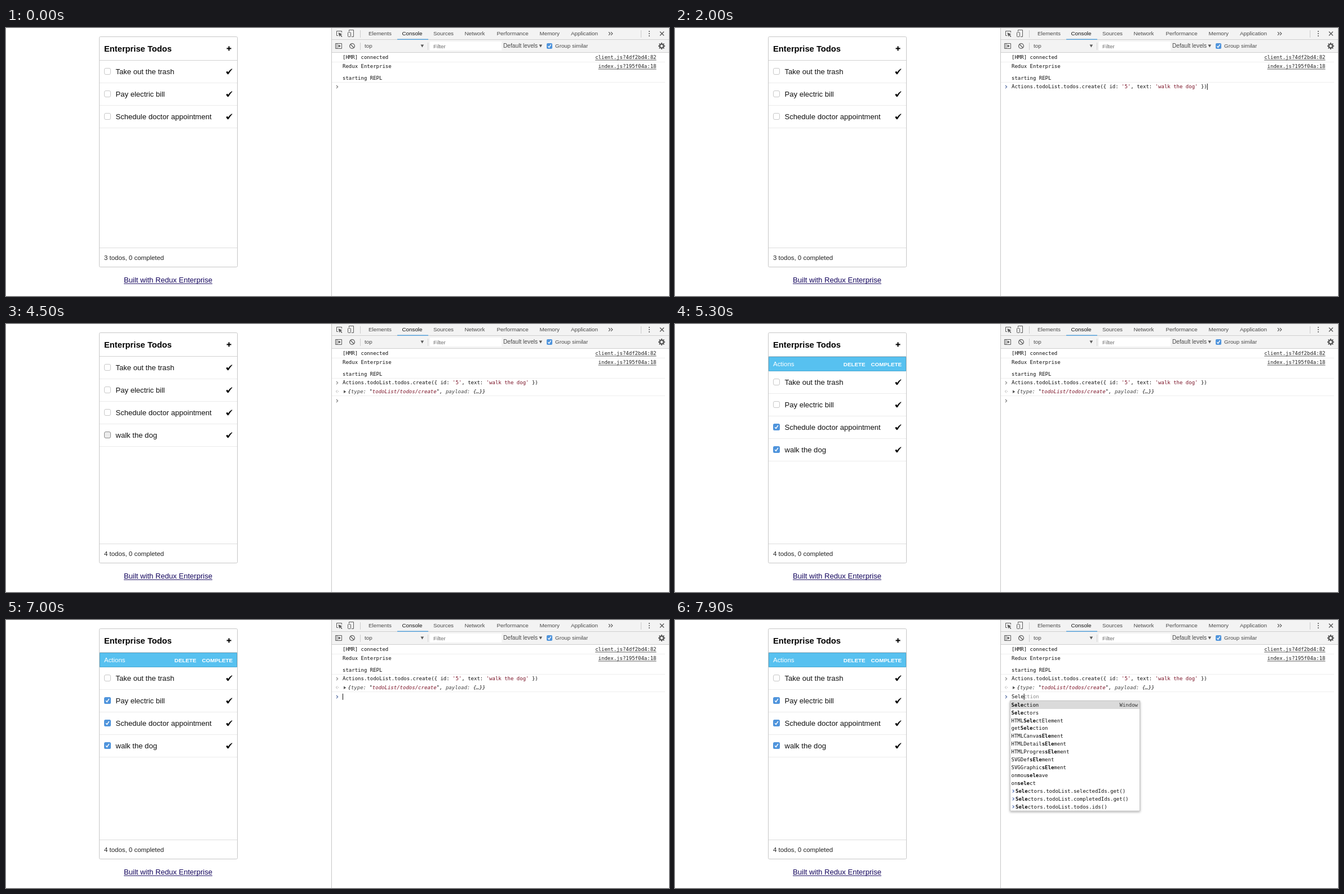
Write an HTML page with a canvas that moves like this. It is 1176 px wide and 476 px high and loops after 8000 ms.

```html
<!DOCTYPE html>
<html lang="en">
<head>
<meta charset="utf-8">
<title>Todo list with console</title>
<style>
html, body { margin: 0; width: 100%; height: 100%; overflow: hidden; background: #fff; }
canvas { display: block; }
</style>
</head>
<body>
<canvas id="stage" width="1176" height="476"></canvas>
<script>
const ctx = document.getElementById('stage').getContext('2d');
const LOOP = 8000;
const SANS = '"Liberation Sans", Arial, sans-serif';
const MONO = '"DejaVu Sans Mono", monospace';
const CODE = `9px ${MONO}`;
const CODE_BOLD = `bold 9px ${MONO}`;
const CODE_ITALIC = `italic 9px ${MONO}`;
const UI = `9.82px ${SANS}`;
const CHAR = 5.418;
const INK = '#111', RED = '#7a1226', BLUE = '#4f94dc';

// Moments of the story, in ms
const FOCUS = 900, RECALL = 1600, RUN = 2400, BLUR = 4000;
const REFOCUS = 6700;
const KEYS = [7300, 7500, 7700, 7800];
const TODOS = [
  { text: 'Take out the trash' },
  { text: 'Pay electric bill', press: 5800, check: 5900 },
  { text: 'Schedule doctor appointment', press: 5000, check: 5100 },
  { text: 'walk the dog', press: 4400, check: 4600 }
];
const COMMAND = [
  ['Actions.todoList.todos.create({ id: ', INK], ["'5'", RED],
  [', text: ', INK], ["'walk the dog'", RED], [' })', INK]
];
const RESULT = [
  ['{', INK], ['type: ', '#444'], ['"', INK], ['todoList/todos/create', RED],
  ['", ', INK], ['payload: ', '#444'], ['{…}}', INK]
];
const HINTS = ['Selection', 'Selectors', 'HTMLSelectElement', 'getSelection',
  'HTMLCanvasElement', 'HTMLDetailsElement', 'HTMLProgressElement', 'SVGDefsElement',
  'SVGGraphicsElement', 'onmouseleave', 'onselect'];
const HISTORY = ['Selectors.todoList.selectedIds.get()',
  'Selectors.todoList.completedIds.get()', 'Selectors.todoList.todos.ids()'];

function rect(x, y, w, h, color) {
  ctx.fillStyle = color;
  ctx.fillRect(x, y, w, h);
}

function text(str, x, y, font, color = INK, align = 'left') {
  ctx.font = font;
  ctx.fillStyle = color;
  ctx.textAlign = align;
  ctx.fillText(str, x, y);
}

function runs(parts, x, y, font) {
  for (const [str, color] of parts) {
    text(str, x, y, font, color);
    x += str.length * CHAR;
  }
  return x;
}

function line(points, color, width = 1) {
  ctx.strokeStyle = color;
  ctx.lineWidth = width;
  ctx.beginPath();
  points.forEach(([x, y]) => ctx.lineTo(x, y));
  ctx.stroke();
}

function poly(points, color) {
  ctx.fillStyle = color;
  ctx.beginPath();
  points.forEach(([x, y]) => ctx.lineTo(x, y));
  ctx.fill();
}

function box(x, y, w, h, r, fill, stroke) {
  ctx.beginPath();
  ctx.roundRect(x, y, w, h, r);
  ctx.fillStyle = fill;
  ctx.fill();
  if (!stroke) return;
  ctx.strokeStyle = stroke;
  ctx.lineWidth = 1;
  ctx.stroke();
}

function circle(x, y, r, color, width) {
  ctx.beginPath();
  ctx.arc(x, y, r, 0, 7);
  ctx.lineWidth = width;
  ctx.strokeStyle = ctx.fillStyle = color;
  width ? ctx.stroke() : ctx.fill();
}

const chevron = (x, y, color, s = 2.6) =>
  line([[x, y - s], [x + s, y], [x, y + s]], color, 1.2);

const downArrow = (x, y) => poly([[x - 2.8, y - 2.4], [x + 2.8, y - 2.4], [x, y + 2.6]], '#5a5a5a');

function heavyCheck(x, y) {
  ctx.fillStyle = INK;
  ctx.beginPath();
  ctx.moveTo(x - 5.6, y + 1.8);
  ctx.quadraticCurveTo(x - 4.2, y - 1, x - 2.8, y + .2);
  ctx.lineTo(x - 1.9, y + 1.5);
  ctx.quadraticCurveTo(x + 1, y - 3, x + 4.6, y - 4.8);
  ctx.quadraticCurveTo(x + 5.8, y - 4.8, x + 5.2, y - 3.8);
  ctx.quadraticCurveTo(x + 1.5, y + .2, x - 1, y + 4.4);
  ctx.quadraticCurveTo(x - 2.6, y + 6, x - 3.6, y + 4.6);
  ctx.fill();
}

function checkbox(x, y, checked, pressed) {
  if (checked) {
    box(x - 6, y - 6, 12, 12, 2.5, BLUE);
    line([[x - 2.8, y + .2], [x - .9, y + 2.5], [x + 2.9, y - 3]], '#fff', 1.4);
  } else {
    box(x - 5.5, y - 5.5, 11, 11, 2.5, pressed ? '#ececec' : '#fff', pressed ? '#8c8c8c' : '#c8c8c8');
  }
}

function drawTodos(t) {
  const count = t < RUN ? 3 : 4;
  const picking = t >= TODOS[3].check;
  box(165.5, 15.5, 245, 409, 2, '#fff', '#c6c6c6');
  text('Enterprise Todos', 174, 42, `bold 14.73px ${SANS}`, '#000');
  rect(391.5, 35.4, 8, 2, '#000');
  rect(394.5, 32.4, 2, 8, '#000');
  rect(166, 57, 244, 1, '#d2d2d2');

  if (picking) {
    box(166.5, 58.5, 243, 25, 0, '#57c1f0', '#4fa9d2');
    text('Actions', 174, 75.3, `11.45px ${SANS}`, '#fff');
    const strong = `bold 9.82px ${SANS}`;
    text('DELETE', 337.5, 75, strong, '#fff', 'right');
    text('COMPLETE', 402, 75, strong, '#fff', 'right');
  }

  TODOS.slice(0, count).forEach((todo, i) => {
    const y = 77 + i * 40 + (picking ? 26 : 0);
    const checked = t >= todo.check;
    checkbox(180, y, checked, !checked && t >= todo.press);
    text(todo.text, 194.5, y + 5, `13.09px ${SANS}`);
    heavyCheck(396, y);
    rect(166, y + 20, 244, 1, '#ebebeb');
  });

  rect(166, 390, 244, 1, '#dedede');
  text(`${count} todos, 0 completed`, 174, 411.5, `11.45px ${SANS}`, '#222');
  text('Built with Redux Enterprise', 209, 452.3, `13.09px ${SANS}`, '#14065e');
  rect(209, 453.6, 157, 1, '#14065e');
}

function drawTabs() {
  const ink = '#5a5a5a';
  rect(578, 0, 598, 43, '#f3f3f3');
  rect(578, 20, 598, 1, '#cfcfcf');
  rect(578, 43, 598, 1, '#cfcfcf');
  rect(577, 0, 1, 476, '#c6c6c6');

  // Inspect and device icons
  line([[589, 13.5], [586.5, 13.5], [586.5, 5.5], [595.5, 5.5], [595.5, 8]], ink);
  poly([[589.5, 8], [596.5, 11], [593.8, 12], [596.5, 15], [595.3, 16], [592.6, 13], [591.2, 15.4]], ink);
  line([[608.5, 6], [608.5, 3.5], [616.5, 3.5], [616.5, 15.5], [613, 15.5]], ink);
  box(606.5, 7.5, 5, 8, 1, '#f3f3f3', ink);
  rect(628, 4, 1, 13, '#ccc');

  const tabs = { Elements: 643, Console: 702.5, Sources: 758, Network: 813.5,
    Performance: 870.5, Memory: 946.5, Application: 1002 };
  for (const name in tabs) {
    text(name, tabs[name], 13.2, UI, name === 'Console' ? INK : '#4a4a4a');
  }
  rect(694, 19.5, 55, 1.5, '#55a0d8');
  for (const x of [1069, 1073]) chevron(x, 10, ink, 2.8);
  rect(1126, 4, 1, 13, '#ccc');
  for (const y of [6, 10, 14]) circle(1141, y, 1.1, ink);
  line([[1160, 6.5], [1167, 13.5]], ink, 1.4);
  line([[1167, 6.5], [1160, 13.5]], ink, 1.4);
}

function drawToolbar() {
  const ink = '#5a5a5a';
  box(584.5, 27.5, 11, 9, 0, '#f3f3f3', ink);
  rect(586.5, 28, 1, 8, ink);
  poly([[589.5, 29.3], [593.8, 32], [589.5, 34.7]], ink);
  circle(614, 32, 4.4, ink, 1.3);
  line([[611, 29], [617, 35]], ink, 1.3);
  rect(628, 26, 1, 13, '#ccc');
  text('top', 636, 35.2, UI, '#4a4a4a');
  downArrow(738.3, 32);
  rect(748, 26, 1, 13, '#d4d4d4');
  rect(752, 24, 127, 16, '#fff');
  text('Filter', 758, 35.5, UI, '#6c6c6c');
  text('Default levels', 882, 35.2, `10.2px ${SANS}`, '#4a4a4a');
  downArrow(948.3, 32);
  box(959, 27, 10, 10, 2, BLUE);
  line([[961.4, 32.2], [963.3, 34.4], [966.6, 29.3]], '#fff', 1.4);
  text('Group similar', 974, 35.2, UI, '#4a4a4a');

  circle(1163, 32, 3.4, ink, 2.4);
  for (let i = 0; i < 8; i++) {
    const a = i * Math.PI / 4, c = Math.cos(a), s = Math.sin(a);
    line([[1163 + 4 * c, 32 + 4 * s], [1163 + 6 * c, 32 + 6 * s]], ink, 2);
  }
}

function source(label, y) {
  text(label, 1153.5, y, CODE, '#222', 'right');
  const w = label.length * CHAR;
  rect(1153.5 - w, y + 1.3, w, .8, '#333');
}

// Bold the part of a suggestion that matches the typed prefix
function hint(str, prefix, x, y) {
  const at = str.toLowerCase().indexOf(prefix.toLowerCase());
  const end = at + prefix.length;
  text(str.slice(0, at), x, y, CODE);
  text(str.slice(at, end), x + at * CHAR, y, CODE_BOLD);
  text(str.slice(end), x + end * CHAR, y, CODE);
}

function drawPopup(prefix) {
  const pitch = 13.91, top = 144;
  ctx.save();
  ctx.shadowColor = 'rgba(0,0,0,.35)';
  ctx.shadowBlur = 4;
  ctx.shadowOffsetY = 1;
  rect(594, top, 231, 195.5, '#fff');
  ctx.restore();
  box(594.5, top - .5, 230, 195.5, 0, '#fff', '#c4c4c4');
  rect(595, top, 229, 14, '#dadada');
  [...HINTS, ...HISTORY].forEach((str, i) => {
    const y = top + 9.7 + i * pitch;
    const past = i >= HINTS.length;
    if (past) chevron(598.8, y - 2.8, '#4a68b0', 2.4);
    hint(str, prefix, past ? 604 : 596.5, y);
  });
  text('Window', 821, top + 9.7, CODE, '#333', 'right');
}

function drawPrompt(t, y) {
  const focused = t >= FOCUS && t < BLUR || t >= REFOCUS;
  const typed = 'Sele'.slice(0, KEYS.filter(k => t >= k).length);
  let x = 597;
  chevron(586, y - 2.7, focused ? '#5069a0' : '#777');
  if (t >= RECALL && t < RUN) x = runs(COMMAND, x, y, CODE);
  if (typed) {
    text(typed, x, y, CODE);
    x += typed.length * CHAR;
    if (typed.length > 2) text('Selection'.slice(typed.length), x, y, CODE, '#888');
  }

  // The caret restarts its blink after each action
  const last = [FOCUS, RECALL, RUN, REFOCUS, ...KEYS].filter(m => t >= m).pop();
  if (focused && (t - last) % 1000 < 500) rect(x, y - 8.5, 1, 11, INK);
  if (typed.length > 2) drawPopup(typed);
}

function drawConsole(t) {
  text('[HMR] connected', 597, 55.3, CODE);
  source('client.js?4df2bd4:82', 55.3);
  rect(578, 60, 591, 1, '#efefef');
  text('Redux Enterprise', 597, 71.3, CODE);
  source('index.js?195f04a:18', 71.3);
  text('starting REPL', 597, 92.3, CODE);
  rect(578, 96, 591, 1, '#efefef');
  if (t < RUN) return drawPrompt(t, 107.3);

  chevron(586, 104.6, '#888');
  runs(COMMAND, 597, 107.3, CODE);
  line([[587.8, 117.4], [585.4, 119.8], [587.8, 122.2]], '#aaa');
  circle(589.3, 119.8, .7, '#aaa');
  poly([[599, 117.4], [603.3, 120.2], [599, 123]], '#555');
  runs(RESULT, 606.5, 123.3, CODE_ITALIC);
  rect(578, 127, 591, 1, '#efefef');
  drawPrompt(t, 139.3);
}

function frame(now) {
  const t = now % LOOP;
  rect(0, 0, 1176, 476, '#fff');
  drawTodos(t);
  drawTabs();
  drawToolbar();
  drawConsole(t);
  requestAnimationFrame(frame);
}
requestAnimationFrame(frame);
</script>
</body>
</html>
```
